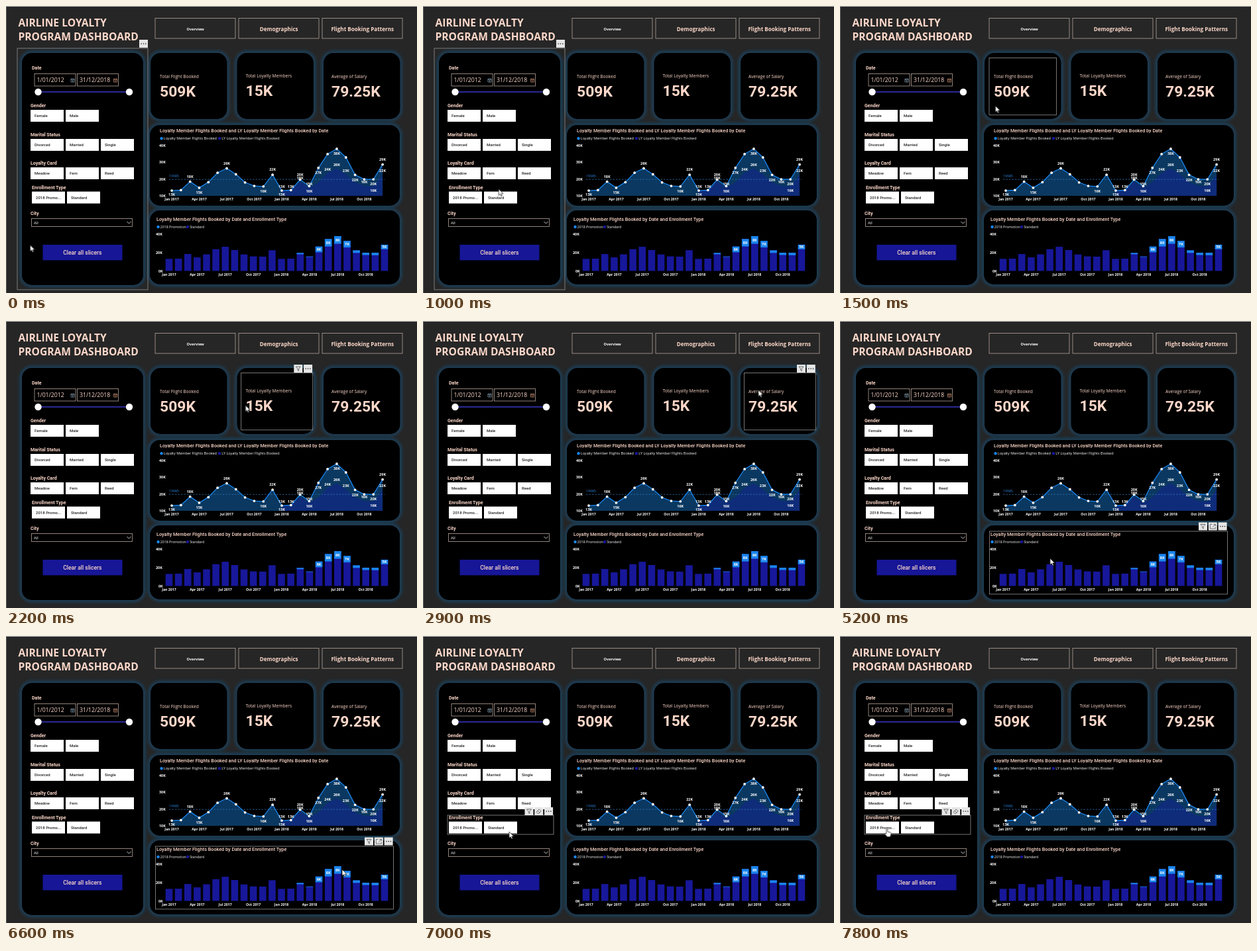
Animation of 620 by 434 pixels, one loop 8000 ms. Source, as an HTML page:

```html
<!DOCTYPE html>
<html lang="en">
<head>
<meta charset="utf-8">
<title>Airline loyalty dashboard</title>
<style>
html, body { margin: 0; width: 100%; height: 100%; overflow: hidden; background: #262626; }
svg { display: block; width: 620px; height: 434px; }
text { font-family: "Open Sans", "Noto Sans", sans-serif; fill: #fff; white-space: pre; }
.din { font-family: Roboto, "Liberation Sans", sans-serif; }
.peach { fill: #fcd7c9; }
.dark { fill: #222; }
.blue { fill: #2f80d8; }
.b { font-weight: 700; }
.m { font-weight: 500; }
.mid { text-anchor: middle; }
.box { fill: none; stroke: #b5a29a; stroke-width: .8; }
.hover { fill: none; stroke: #929292; stroke-width: .8; }
.anim { animation: 8s -20ms infinite step-end; }
#cursor { animation: move 8s -20ms infinite linear; }
</style>
</head>
<body>
<svg id="stage" viewBox="0 0 620 434" xmlns="http://www.w3.org/2000/svg"></svg>
<script>
const out = [], css = [];
const pct = ms => ms / 80 + '%';
const add = s => out.push(s);
const text = (x, y, size, cls, str) =>
  add(`<text x="${x}" y="${y}" font-size="${size}" class="${cls}">${str}</text>`);
const rect = (x, y, w, h, attrs) =>
  add(`<rect x="${x}" y="${y}" width="${w}" height="${h}" ${attrs}/>`);
const dot = (x, y, r, fill) => add(`<circle cx="${x}" cy="${y}" r="${r}" fill="${fill}"/>`);
const line = (x, y, x2, y2, attrs) =>
  add(`<line x1="${x}" y1="${y}" x2="${x2}" y2="${y2}" ${attrs}/>`);

// Visible only between two times
function show(name, from, to) {
  const first = from ? `0%{opacity:0}${pct(from)}{opacity:1}` : '0%{opacity:1}';
  const last = to < 8000 ? `${pct(to)}{opacity:0}` : '';
  css.push(`@keyframes ${name}{${first}${last}100%{opacity:${from ? 0 : 1}}}`);
  return `class="anim" style="animation-name:${name}"`;
}

function panel(x, y, w, h) {
  rect(x, y, w, h, 'rx="15" fill="none" stroke="#1d3d57" stroke-width="7" filter="url(#glow)"');
  rect(x, y, w, h, 'rx="15"');
}

const glyphs = {
  filter: 'M3 3h7l-2.7 3.2v3.3l-1.6-1V6.2z',
  focus: 'M5.5 3H2.5v6.5h8V7M7.5 3h3v2.5M10.5 3L6.5 7',
  erase: 'M2.8 7.2l4-4.2 3 2.8-3.4 3.7H4.8zM4.7 5.3l3 2.7'
};
function icon(x, y, kind) {
  add(`<g transform="translate(${x} ${y})">`);
  rect(0, 0, 13, 12, 'fill="#e6e6e6"');
  if (kind === 'more') [3.2, 6.5, 9.8].forEach(cx => dot(cx, 6, .85, '#333'));
  else add(`<path d="${glyphs[kind]}" fill="none" stroke="#555" stroke-width=".8"/>`);
  add('</g>');
}

add(`<defs><filter id="glow" x="-20%" y="-20%" width="140%" height="140%">
  <feGaussianBlur stdDeviation="2"/></filter></defs>`);
rect(0, 0, 620, 434, 'fill="#262626"');
rect(0, 0, 620, 1, 'fill="#bbb"');
rect(0, 0, .6, 434, 'fill="#888"');

// Header
['AIRLINE LOYALTY', 'PROGRAM DASHBOARD'].forEach((str, i) =>
  text(18.5, 31 + i * 21, 15.6, 'b peach', str));
['Overview', 'Demographics', 'Flight Booking Patterns'].forEach((label, i) => {
  const x = 225 + i * 126;
  rect(x, 18.5, 121, 30.5, 'class="box"');
  text(x + 60.7, i ? 38 : 36.8, i ? 8.1 : 5.6, i ? 'b mid peach' : 'b mid', label);
});

// Slicers
panel(24, 71, 183, 351);
const heading = (x, y, str) => text(x, y, 7.1, 'din b peach', str);
function slicer(x, y, title, names) {
  heading(x, y, title);
  names.forEach((name, i) => {
    rect(x + i * 53, y + 4, 50, 18, 'fill="#fff"');
    text(x + i * 53 + 6, y + 15.4, 6, 'din m dark', name);
  });
}
heading(39, 96, 'Date');
['1/01/2012', '31/12/2018'].forEach((str, i) => {
  const x = 43 + i * 64.5;
  rect(x, 102.5, 62, 18.5, 'class="box"');
  text(x + 3.5, 115, 8.7, 'peach', str);
  add(`<path d="M${x + 55} 110h5v5h-5zm0 1.6h5m-2.5 0v3.4" fill="none"
    stroke="${i ? '#b98368' : '#7d93a5'}" stroke-width=".8"/>`);
});
line(48, 129.8, 186, 129.8, 'stroke="#2f2fa8" stroke-width="1.8"');
[48.5, 186].forEach(x => dot(x, 130, 5.2, '#fff'));
slicer(37, 153, 'Gender', ['Female', 'Male']);
slicer(37, 197, 'Marital Status', ['Divorced', 'Married', 'Single']);
slicer(37, 240, 'Loyalty Card', ['Meadow', 'Fern', 'Reed']);
slicer(39, 276.6, 'Enrollment Type', ['2018 Promo...', 'Standard']);
heading(37, 316, 'City');
rect(38.5, 321.5, 152, 12, 'class="box"');
text(42, 330, 6, '', 'All');
add('<path d="M182.5 326l3 3 3-3" fill="none" stroke="#ddd" stroke-width=".9"/>');
rect(55.5, 361, 120, 23.5, 'fill="#161696"');
text(115.3, 376, 8.5, 'din m mid peach', 'Clear all slicers');

// Cards
[['Total Flight Booked', '509K'], ['Total Loyalty Members', '15K'],
 ['Average of Salary', '79.25K']].forEach(([label, value], i) => {
  const x = 218 + i * 130.5, tx = 232 + i * 129.5, dy = i === 1 ? -.8 : 0;
  panel(x, 71, 115.5, 100);
  text(tx, 109 + dy, 6.65, 'peach', label);
  text(tx, 136.6 + dy, 22.9, 'din b peach', value);
});

// Monthly bookings in thousands: a rising base, a July peak, March and December events
const growth = [1, 1.065, 1.47, 1.44, 1.25, 1.27];
const event = m => m === 2 ? 4.7 : m === 11 ? 6.74 : 0;
const lastYear = m => 13.1 + .24 * m + 11.8 * Math.exp(-(((m - 5.87) / 1.8) ** 2)) + event(m);
const months = Array.from({ length: 24 }, (_, i) => {
  const m = i % 12, base = lastYear(m);
  if (i < 12) return { v: base, promo: 0 };
  const g = growth[m >> 1], v = base * g;
  return { v, base, promo: v * (g - 1) * .5 + event(m) * .17 };
});
const total = months.map(d => d.v), previous = total.slice(0, 12);
const bright = '#1a86ee', deep = '#17179a';

const axisDates = (x0, step, y) => {
  for (let i = 0; i < 24; i += 3)
    text(x0 + i * step, y, 5.2, 'b mid',
      `${['Jan', 'Apr', 'Jul', 'Oct'][i / 3 % 4]} ${i < 12 ? 2017 : 2018}`);
};
function legend(x, x2, y, size, names) {
  dot(x, y, 2.2, bright);
  text(x + 3.2, y + 2, size, '', names[0]);
  dot(x2, y, 2.2, deep);
  text(x2 + 3.2, y + 2, size, '', names[1]);
}

// Area chart
const ax = i => 250 + i * 13.83, ay = v => 287 - (v - 10) * 2.55;
const pts = (vals, start) => vals.map((v, i) => `${ax(i + start).toFixed(1)} ${ay(v).toFixed(1)}`).join('L');
const area = (vals, start, fill) =>
  add(`<path d="M${ax(start)} 287L${pts(vals, start)}V287z" fill="${fill}"/>`);

panel(217, 180, 377, 122);
text(232, 190.6, 7.23, 'din m peach',
  'Loyalty Member Flights Booked and LY Loyalty Member Flights Booked by Date');
legend(234.6, 322, 200.2, 5.5, ['Loyalty Member Flights Booked', 'LY Loyalty Member Flights Booked']);
[40, 30, 20, 10].forEach(v => text(231, ay(v) + 2.2, 5.4, 'b', v + 'K'));
area(total, 0, '#0b3860');
area(previous, 12, '#0f2c7a');
line(246, 262.2, 571, 262.2, 'stroke="#2c71b4" stroke-width=".8" stroke-dasharray="2.5 2"');
text(246, 259, 5.2, 'blue', '19985');
add(`<path d="M${pts(total, 0)}" fill="none" stroke="${bright}" stroke-width="1.3"/>`);
total.forEach((v, i) => dot(ax(i), ay(v), 1.9, '#fff'));

// Turning points are labelled, and in 2018 most of last year's values too
const label = (i, y, v) => text(ax(i), y, 5.5, 'b mid', Math.round(v) + 'K');
months.forEach(({ v, base }, i) => {
  const before = total[i - 1] ?? 99, after = total[i + 1] ?? 0;
  const peak = v > before && v > after, dip = v < before && v < after;
  const y = peak ? Math.max(225, ay(v) - 5.8) : Math.min(287, ay(v) + 9.3);
  const own = peak || dip || i > 12 && i % 4 === 0;
  if (own) label(i, y, v);
  if (base && (i < 16 || i % 4)) {
    const ly = ay(base) - 3.7;
    label(i, own && Math.abs(ly - y) < 4 ? ly + 12 : ly, base);
  }
});
axisDates(250, 13.83, 294.3);

// Stacked bars
const bx = i => 246 + i * 14.13, by = v => 400.6 - v * 1.39;
panel(217, 309, 377, 112);
text(227, 325, 7.25, 'din m peach', 'Loyalty Member Flights Booked by Date and Enrollment Type');
legend(229.6, 274, 334, 5.2, ['2018 Promotion', 'Standard']);
[40, 20, 0].forEach(v => text(v ? 226 : 230, by(v) + 2, 5.4, 'b', v + 'K'));
months.forEach(({ v, promo }, i) => {
  const x = bx(i) - 5.3;
  rect(x, by(v), 10.6, v * 1.39, `fill="${deep}"`);
  rect(x, by(v), 10.6, promo * 1.39, `fill="${bright}"`);
  if (promo > 4) text(bx(i), by(v - promo / 2) + 2, 5.5, 'b mid', Math.round(promo) + 'K');
});
axisDates(246, 14.13, 408);

// Hover frames with header icons at the right end
function hover(name, from, to, [x, y, w, h], icons, iconX, iconY, delay = 0) {
  add(`<g ${show(name, from, to)}>`);
  rect(x, y, w, h, 'class="hover"');
  add('</g>');
  add(`<g ${show(name + 'Icons', from + delay, to)}>`);
  icons.forEach((kind, i) => icon(iconX + i * 14.8, iconY, kind));
  add('</g>');
}
const pair = ['filter', 'more'], trio = ['filter', 'focus', 'more'];
hover('group', 0, 1200, [17, 64, 197, 365], ['more'], 201, 51);
[1400, 2100, 2700].forEach((from, i) => {
  const x = 225 + i * 129.7;
  hover('card' + i, from, from + 600, [x, 78.5, 108 - (i < 1) * 6.5, 86.3], pair, x + 79.6, 66, i ? 0 : 200);
});
hover('lines', 3500, 4800, [230.5, 183.5, 350.5, 116], trio, 538, 171);
hover('bars', 4900, 6800, [225.5, 318, 359, 95], trio, 541, 304.5);
hover('enroll', 7000, 8000, [37, 271, 160, 29], ['filter', 'erase', 'more'], 153.5, 259);

// Pointer path: time, x, y; the position advances every 100 ms
const path = [[0, 36.5, 361.5], [800, 66, 327], [1500, 234.5, 151], [2000, 320, 134],
  [2900, 506, 104.5], [3100, 508, 108], [3500, 395, 190], [3800, 262, 256], [4100, 271, 264],
  [4700, 305, 300], [5200, 317, 359], [6000, 420, 362], [6600, 507, 353], [7000, 130, 296],
  [7200, 55, 282], [7800, 70.5, 291], [8000, 70.5, 291]];
css.push('@keyframes move{' + path.map(([t, x, y], i) => {
  const n = i + 1 < path.length ? (path[i + 1][0] - t) / 100 : 1;
  return `${pct(t)}{transform:translate(${x}px,${y}px);animation-timing-function:steps(${n})}`;
}).join('') + '}');
const pointerX = t => {
  const k = path.findIndex(p => p[0] > t), [t0, x0] = path[k - 1], [t1, x1] = path[k];
  return x0 + (x1 - x0) * (t - t0) / (t1 - t0);
};

// Crosshair snaps to the month nearest the pointer, one step late
let snap = '@keyframes snap{';
for (let t = 3700; t < 4600; t += 100)
  snap += `${pct(t)}{transform:translateX(${Math.round((pointerX(t - 100) - 250) / 13.83) * 13.83}px)}`;
css.push(snap + '}');
add(`<g ${show('cross', 3700, 4600)}><g class="anim" style="animation-name:snap">`);
line(250, 210, 250, 287, 'stroke="#666" stroke-width=".7"');
add('</g></g>');

add('<g id="cursor" stroke="#111" stroke-width=".7" fill="#fff" stroke-linejoin="round">');
add(`<path ${show('arrow', 0, 7100)} d="M0 0v9.6l2.2-2 1.5 3.3 1.6-.7-1.5-3.2h3z"/>`);
add(`<path ${show('hand', 7100, 8000)} d="M-.6 1.2Q.4-.6 1.4 1.2V5l4.2 1q1.1.4 1 1.6L6 10.6 5.2 12.8H.6L-2.6 8.6
  q-.5-1.4.6-1.5L-.6 8z"/>`);
add('</g>');

const style = document.createElement('style');
style.textContent = css.join('\n');
document.head.append(style);
document.getElementById('stage').innerHTML = out.join('');
</script>
</body>
</html>
```
